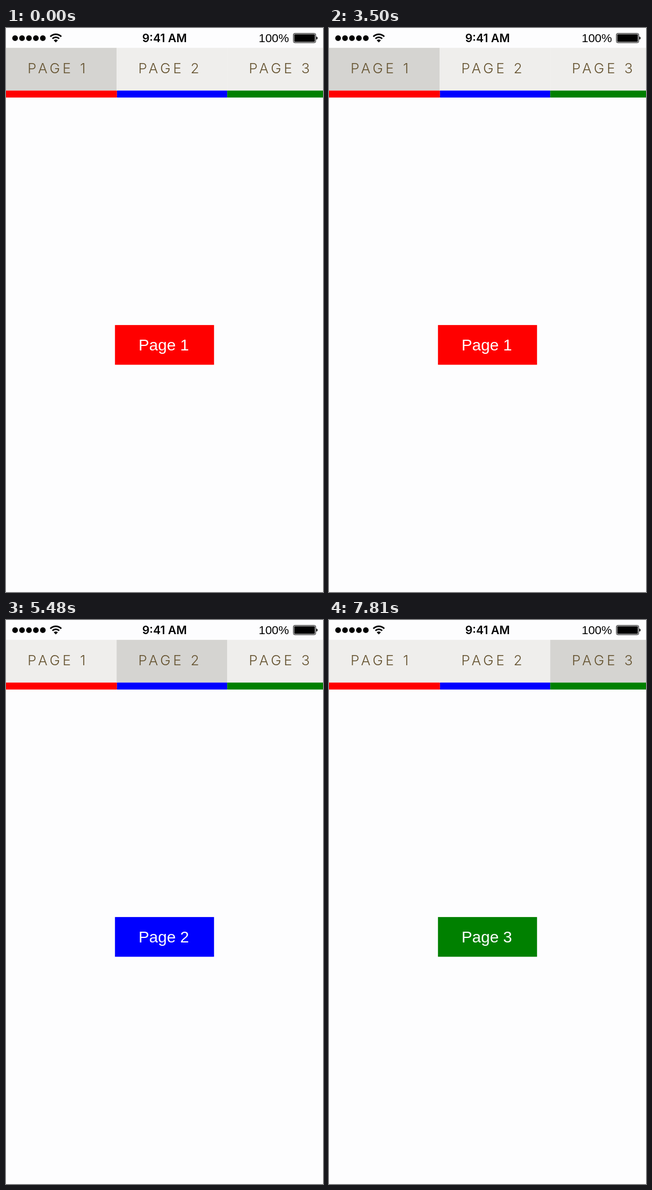
An HTML page that plays this animation: 562 by 997 pixels, repeating every 7990 ms.

```html
<!DOCTYPE html>
<html lang="en">
<head>
<meta charset="utf-8">
<title>Tab pages</title>
<style>
  html, body { margin: 0; width: 100%; height: 100%; overflow: hidden; background: #fdfdfe; }
  svg { display: block; width: 562px; height: 997px; }
  text { font-family: "Liberation Sans", Arial, sans-serif; }
  .clock { font: 600 20.2px Inter, sans-serif; text-anchor: middle; }
  .charge { font-size: 21px; }
  .tab text {
    font: 300 24.8px Inter, sans-serif;
    font-optical-sizing: none;
    letter-spacing: 4.6px;
    fill: #655330;
  }
  .label { font-size: 28.2px; fill: #fff; }
</style>
</head>
<body>
<svg viewBox="0 0 562 997">
  <rect width="562" height="997" fill="#fdfdfe"/>
  <g id="signal"></g>
  <g fill="none" stroke="#000" stroke-width="2.7">
    <path d="M78.6 15.2a13.4 13.4 0 0 1 19.4 0"/>
    <path d="M82.3 18.9a8.3 8.3 0 0 1 12 0"/>
  </g>
  <path d="M84.6 21.7a5.2 5.2 0 0 1 7.4 0L88.3 25.6z"/>
  <text class="clock" x="281" y="25.3">9:41 AM</text>
  <text class="charge" x="448" y="25">100%</text>
  <rect x="509.5" y="9.5" width="39.5" height="16.5" rx="2.5" fill="none" stroke="#000"/>
  <rect x="511" y="11" width="36.5" height="13.5" rx="1.2"/>
  <path d="M550.2 15q2.2 .4 2.2 2.8t-2.2 2.8z"/>
  <g id="tabs"></g>
  <rect id="box" x="193.2" y="525.1" width="175.6" height="70.2"/>
  <text id="label" class="label" x="235" y="570"></text>
</svg>
<script>
const LOOP = 7990;
const TAB_WIDTH = 196.1;
const PRESSED = 0.8;
const COLORS = ["#f00", "#00f", "#008000"];
const BAR_EDGES = [0, 196.8, 392.2, 562];
// When each page opens, and when its tab fades back to full opacity.
const PAGES = [
  { start: 0 },
  { start: 4910, fadeFrom: 4935, fadeTo: 5080 },
  { start: 7560, fadeFrom: 7585, fadeTo: 7810 },
];

const byId = id => document.getElementById(id);

function add(parent, name, attrs, text = "") {
  const node = document.createElementNS("http://www.w3.org/2000/svg", name);
  for (const key in attrs) node.setAttribute(key, attrs[key]);
  node.textContent = text;
  return parent.appendChild(node);
}

for (let i = 0; i < 5; i++) {
  add(byId("signal"), "circle", { cx: 16.1 + i * 12.3, cy: 18, r: 5 });
}

const tabs = COLORS.map((color, i) => {
  const x = i * TAB_WIDTH;
  const barX = BAR_EDGES[i];
  const group = add(byId("tabs"), "g", { class: "tab" });
  const back = add(group, "rect", { x, y: 35.1, width: TAB_WIDTH, height: 75.5 });
  add(group, "rect", { x: barX, y: 110.6, width: BAR_EDGES[i + 1] - barX, height: 12.3, fill: color });
  add(group, "text", { x: 38.3 + x, y: 80.2 }, `PAGE ${i + 1}`);
  return { group, back };
});

function easeInOut(p) {
  return p < 0.5 ? 2 * p * p : 1 - 2 * (1 - p) ** 2;
}

function tabOpacity({ fadeFrom, fadeTo }, t) {
  if (fadeFrom === undefined) return 1;
  const p = Math.min(1, Math.max(0, (t - fadeFrom) / (fadeTo - fadeFrom)));
  return PRESSED + (1 - PRESSED) * easeInOut(p);
}

function render(t) {
  const current = PAGES.findLastIndex(page => t >= page.start);
  tabs.forEach(({ group, back }, i) => {
    const active = i === current;
    back.setAttribute("fill", active ? "#d5d4d1" : "#efeeec");
    group.setAttribute("opacity", active ? tabOpacity(PAGES[i], t) : 1);
  });
  byId("box").setAttribute("fill", COLORS[current]);
  byId("label").textContent = `Page ${current + 1}`;
}

const began = performance.now();
function tick() {
  render((performance.now() - began) % LOOP);
  requestAnimationFrame(tick);
}
tick();
</script>
</body>
</html>
```
